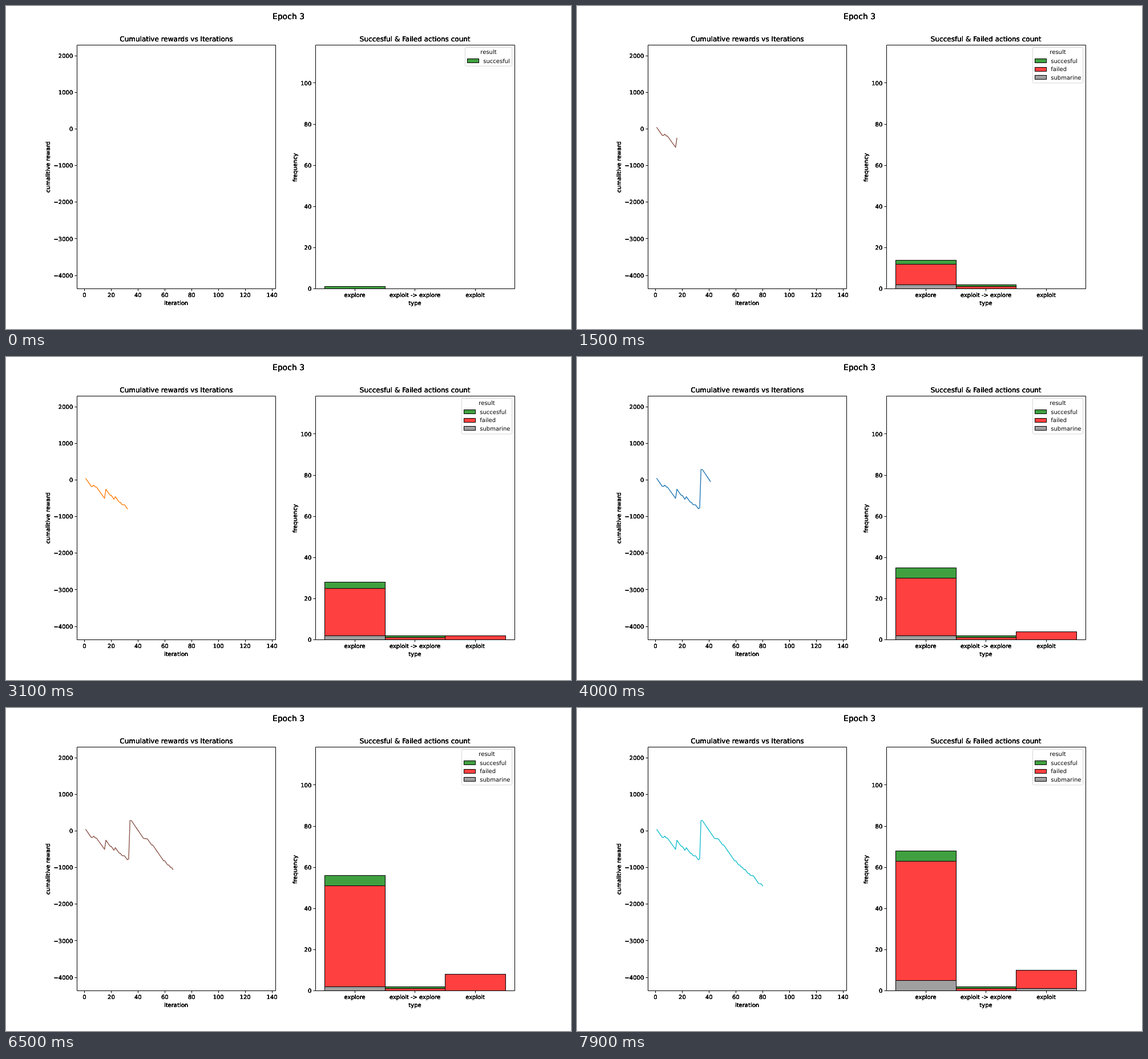
Recreate the animation shown at these times as an HTML page. Size 990x566 px, loop 8000 ms.

```html
<!DOCTYPE html>
<html lang="en">
<head>
<meta charset="utf-8">
<title>Epoch 3</title>
<style>
  html, body { margin: 0; width: 100%; height: 100%; overflow: hidden; background: #fff; }
  svg { display: block; }
  text { font: 10px "DejaVu Sans", sans-serif; text-anchor: middle; text-rendering: geometricPrecision; }
  .title { font-size: 12px; }
  .head { font-size: 14px; }
  .end { text-anchor: end; }
  .start { text-anchor: start; }
  #axes { fill: none; stroke: #000; stroke-width: 1; }
  #labels { filter: url(#harden); }
  #line { fill: none; stroke-width: 1.4; stroke-linejoin: round; stroke-linecap: square; }
  #bars rect, #legend .key { stroke: #000; stroke-width: 1; }
  #legend .frame { fill: #fff; stroke: #d6d6d6; }
</style>
</head>
<body>
<svg width="990" height="566" viewBox="0 0 990 566">
  <!-- Darkens soft glyph edges, like text painted over itself several times -->
  <filter id="harden" filterUnits="userSpaceOnUse" x="0" y="0" width="990" height="566">
    <feComponentTransfer><feFuncA type="table" tableValues="0 .75 .96 1 1"/></feComponentTransfer>
  </filter>
  <polyline id="line"/>
  <g id="bars"></g>
  <path id="axes"/>
  <g id="labels"></g>
  <g id="legend"></g>
</svg>
<script>
const STEP_MS = 100, STEPS = 80;
const LINE_COLORS = ['#1f77b4', '#ff7f0e', '#2ca02c', '#d62728', '#9467bd',
                     '#8c564b', '#e377c2', '#7f7f7f', '#bcbd22', '#17becf'];
const RESULTS = { succesful: '#40a040', failed: '#ff4040', submarine: '#a0a0a0' };
const TYPES = ['explore', 'exploit -> explore', 'exploit'];
const BAR_EDGES = [558.5, 664.5, 769.5, 875.5];

// Cumulative reward at turning points: [iteration, value]
const KNOTS = [
  [1, 40], [5, -170], [6, -175], [7, -140], [8, -185], [9, -195], [15, -500], [16, -250],
  [19, -410], [20, -420], [22, -525], [23, -455], [26, -605], [27, -615], [28, -670],
  [30, -680], [32, -785], [33, -760], [34, 289], [35, 289], [44, -200], [47, -215],
  [50, -375], [51, -385], [59, -810], [60, -815], [62, -925], [63, -930], [64, -985],
  [65, -995], [66, -1050], [67, -1052], [69, -1155], [70, -1165], [71, -1215],
  [73, -1220], [77, -1435], [79, -1445], [80, -1500]
];

// Iterations that are not a failed exploration: [type, result, iterations]
const EVENTS = [
  [0, 'succesful', [1, 7, 23, 33, 34]],
  [0, 'submarine', [6, 9, 67, 73, 78]],
  [1, 'failed', [15]],
  [1, 'succesful', [16]],
  [2, 'failed', [29, 30, 35, 40, 47, 48, 51, 60, 72]],
  [2, 'submarine', [70]]
];

const $ = id => document.getElementById(id);
const px = i => 137.5 + i * 2.347;
const py = v => 215.6 - v * 0.0641;
const by = n => 495.5 - n * 3.606;
const snap = v => Math.floor(v) + 0.5;

function add(parent, tag, attrs, text) {
  const el = document.createElementNS('http://www.w3.org/2000/svg', tag);
  for (const k in attrs) el.setAttribute(k, attrs[k]);
  if (text !== undefined) el.textContent = text;
  parent.appendChild(el);
}

function label(text, x, y, cls = '', turn) {
  const attrs = { x, y, class: cls };
  if (turn) attrs.transform = `rotate(-90 ${x} ${y})`;
  add($('labels'), 'text', attrs, text);
}

function drawStatic() {
  let path = 'M124.5 68.5H472.5V495.5H124.5ZM542.5 68.5H891.5V495.5H542.5Z';
  const xTick = (x, text) => {
    path += `M${snap(x)} 495.5v4`;
    label(text, x, 510);
  };
  const yTick = (x, y, text) => {
    path += `M${x} ${snap(y)}h-4`;
    label(text, x - 7.2, y + 3.6, 'end');
  };
  for (let i = 0; i <= 140; i += 20) xTick(px(i), i);
  for (let v = -4000; v <= 2000; v += 1000) yTick(124.5, py(v), String(v).replace('-', '\u2212'));
  for (let n = 0; n <= 100; n += 20) yTick(542.5, by(n), n);
  TYPES.forEach((t, i) => xTick((BAR_EDGES[i] + BAR_EDGES[i + 1]) / 2 - 0.4, t));
  $('axes').setAttribute('d', path);

  label('Epoch 3', 495, 22.5, 'head');
  label('Cumulative rewards vs Iterations', 298.5, 62, 'title');
  label('Succesful & Failed actions count', 716.7, 62, 'title');
  label('iteration', 298, 524);
  label('type', 716.5, 523.5);
  label('cumalitive reward', 76.5, 282, '', true);
  label('frequency', 509.5, 283, '', true);
}

function reward(i) {
  const k = Math.max(1, KNOTS.findIndex(p => p[0] >= i));
  const [x0, y0] = KNOTS[k - 1], [x1, y1] = KNOTS[k];
  return y0 + (y1 - y0) * (i - x0) / (x1 - x0);
}

function countResults(iter) {
  const counts = TYPES.map(() => ({ submarine: 0, failed: 0, succesful: 0 }));
  let special = 0;
  for (const [type, result, at] of EVENTS) {
    const n = at.filter(i => i <= iter).length;
    counts[type][result] = n;
    special += n;
  }
  counts[0].failed = iter - special;
  return counts;
}

function drawLine(iter) {
  const points = [];
  if (iter > 1) for (let i = 1; i <= iter; i++) points.push(`${px(i)},${py(reward(i))}`);
  $('line').setAttribute('points', points.join(' '));
  $('line').setAttribute('stroke', LINE_COLORS[(iter - 1) % 10]);
}

function drawBars(counts) {
  $('bars').replaceChildren();
  counts.forEach((count, i) => {
    let total = 0;
    for (const result in count) {
      if (!count[result]) continue;
      const bottom = snap(by(total));
      const top = snap(by(total += count[result]));
      add($('bars'), 'rect', {
        x: BAR_EDGES[i], y: top, width: BAR_EDGES[i + 1] - BAR_EDGES[i],
        height: bottom - top, fill: RESULTS[result]
      });
    }
  });
}

function drawLegend(counts) {
  const legend = $('legend');
  const seen = Object.keys(RESULTS).filter(r => counts.some(c => c[r]));
  const left = seen.includes('submarine') ? 798.5 : 804.5;
  legend.replaceChildren();
  add(legend, 'rect', {
    class: 'frame', x: left, y: 72.5, width: 886.5 - left, height: 18 + 14.8 * seen.length, rx: 2
  });
  add(legend, 'text', { x: (left + 886.5) / 2, y: 84.3 }, 'result');
  seen.forEach((r, i) => {
    const y = 92.5 + 14.7 * i;
    add(legend, 'rect', { class: 'key', x: left + 4, y: snap(y), width: 20, height: 7, fill: RESULTS[r] });
    add(legend, 'text', { class: 'start', x: left + 31.8, y: y + 7 }, r);
  });
}

let shown = -1;
const start = performance.now();

function tick() {
  const step = Math.floor((performance.now() - start) / STEP_MS) % STEPS;
  if (step !== shown) {
    shown = step;
    const counts = countResults(step + 1);
    drawLine(step + 1);
    drawBars(counts);
    drawLegend(counts);
  }
  requestAnimationFrame(tick);
}

drawStatic();
tick();
</script>
</body>
</html>
```
